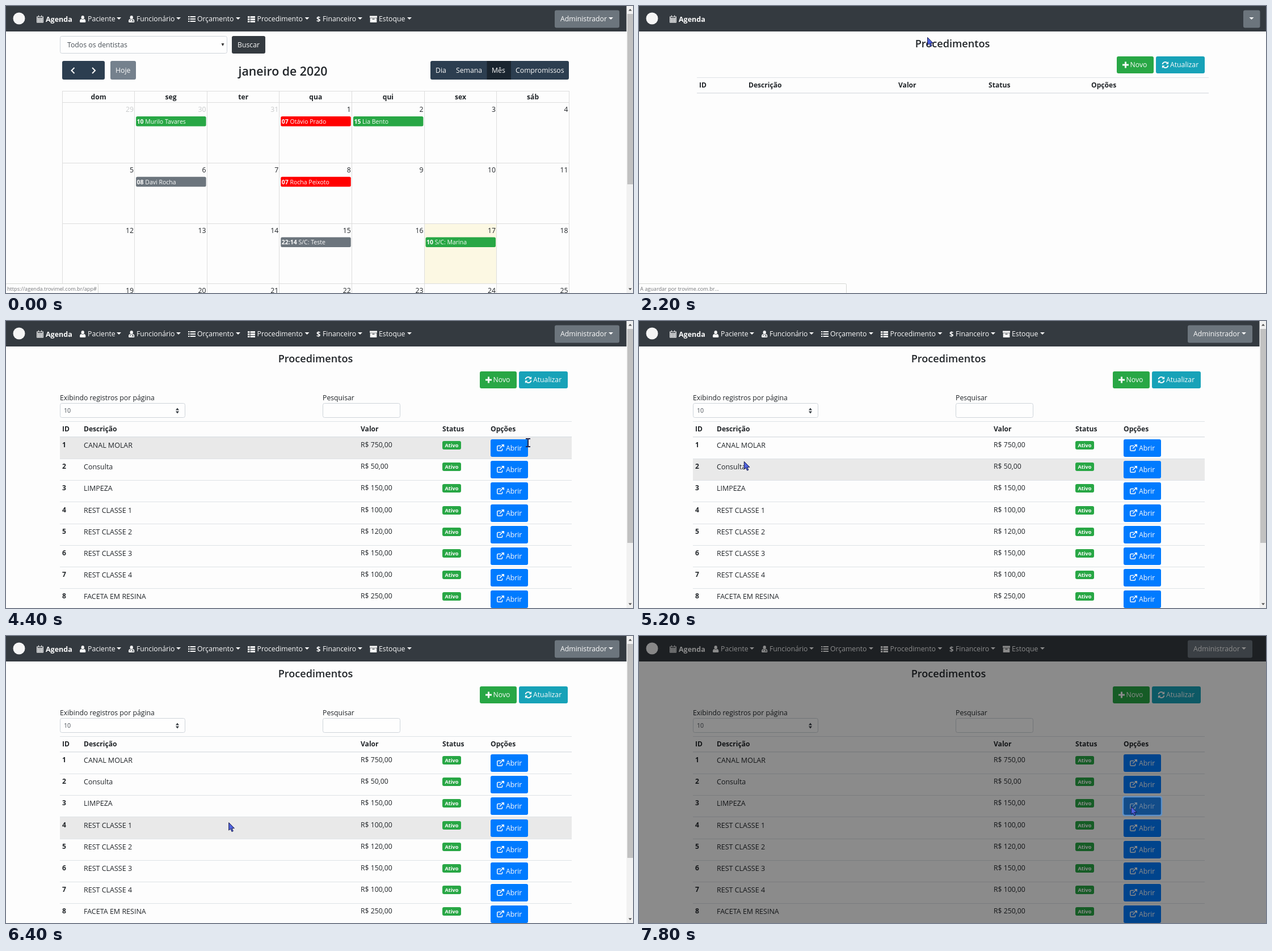
Write an HTML page that moves like this. It is 1105 px wide and 507 px high and loops after 8000 ms.

```html
<!DOCTYPE html>
<html lang="pt-BR">
<head>
<meta charset="utf-8">
<title>Procedimentos</title>
<style>
  html, body { margin: 0; width: 100%; height: 100%; overflow: hidden; background: #fdfdfd; }
  svg { display: block; }
  text { font-family: "Open Sans", "Noto Sans", sans-serif; white-space: pre; }
</style>
</head>
<body>
<svg id="stage" width="1105" height="507" viewBox="0 0 1105 507"></svg>
<script>
const INK = '#212529', LINE = '#dee2e6', GREEN = '#28a745', GREY = '#6c757d', BLUE = '#007bff';
const ROW_TOP = 205, ROW_H = 38.2;

// y is the vertical middle of the capitals
const text = (x, y, s, { size = 12.25, fill = INK, weight = 400, anchor = 'start' } = {}) =>
  `<text x="${x}" y="${Math.round(y + size * .36)}" font-size="${size}" fill="${fill}" font-weight="${weight}" text-anchor="${anchor}">${s}</text>`;
const bold = (x, y, s, opt = {}) => text(x, y, s, { size: 12.1, weight: 700, ...opt });
const white = (x, y, s, opt = {}) => text(x, y, s, { fill: '#fbfbfb', ...opt });
const rect = (x, y, w, h, fill, extra = '') =>
  `<rect x="${x}" y="${y}" width="${w}" height="${h}" fill="${fill}" ${extra}/>`;
const button = (x, y, w, h, fill, extra = '') => rect(x, y, w, h, fill, `rx="3" ${extra}`);
const field = (x, y, w, h) => button(x + .5, y + .5, w - 1, h - 1, '#fefefe', 'stroke="#ced4da"');
const path = (d, fill, extra = '') => `<path d="${d}" fill="${fill}" ${extra}/>`;
const stroke = (d, color, width = 1) => path(d, 'none', `stroke="${color}" stroke-width="${width}"`);
const at = (x, y, body) => `<g transform="translate(${x} ${y})">${body}</g>`;
const group = (id, body) => `<g id="${id}">${body}</g>`;
const caret = (x, y, fill = '#fbfbfb') => path(`M${x - 4} ${y - 2}h8l-4 4z`, fill);

const person = path('M2.5 3.2a2.7 3.1 0 1 1 5.4 0a2.7 3.1 0 1 1-5.4 0M0 10.5C0 7.5 1 6 2.6 6Q5.2 8 7.8 6C9.4 6 10.4 7.5 10.4 10.5Q10.4 12 9 12H1.4Q0 12 0 10.5Z', '#fbfbfb');
const bullets = (dot, bar) => [1, 5, 9].map(y =>
  rect(0, y, dot, bar, '#fbfbfb') + rect(dot + 1.2, y, 11.8 - dot, bar, '#fbfbfb')).join('');
const icon = {
  calendar: stroke('M.7 2.5h10.6v9.8H.7zM.7 5.4h10.6M.7 7.7h10.6M.7 10h10.6M3.4 5v7M6 5v7M8.6 5v7M3.4 0v3M8.6 0v3', '#fbfbfb', 1.15),
  person,
  doctor: person + stroke('M3 7v3M7.4 7v2M6.2 10.6v-1.4h2.4v1.4', '#343a40', .9),
  list: bullets(2.4, 2),
  table: bullets(3.4, 3),
  archive: rect(0, .5, 13, 3.2, '#fbfbfb') + rect(.7, 4.4, 11.6, 7.6, '#fbfbfb') + rect(4.5, 5.6, 4, 1.2, '#343a40'),
  plus: path('M4 0h3v4h4v3H7v4H4V7H0V4h4z', '#fbfbfb'),
  refresh: stroke('M1 5A5 5 0 0 1 9.6 2.6M11 7A5 5 0 0 1 2.4 9.4', '#fbfbfb', 1.9) +
    path('M11.6 0v4.8H6.8zM.4 12V7.2h4.8z', '#fbfbfb'),
  open: stroke('M7 2.5H2.4Q.8 2.5 .8 4.1v5.6q0 1.6 1.6 1.6H8q1.6 0 1.6-1.6V7.5M5 7.3L11 1.4', '#fbfbfb', 1.5) +
    path('M7.8 0H13v5.2z', '#fbfbfb')
};

function navigation() {
  const items = [
    ['person', 130, 144, 'Paciente', 199], ['doctor', 216, 230, 'Funcionário', 304],
    ['list', 321, 337, 'Orçamento', 409], ['table', 426, 442.5, 'Procedimento', 530.5],
    [null, 547, 558, 'Financeiro', 624], ['archive', 641, 657, 'Estoque', 711]
  ];
  const menu = items.map(([name, ix, tx, label, cx]) =>
    (name ? at(ix, 17, icon[name]) : white(ix, 23, '$', { weight: 700, size: 13 })) +
    white(tx, 23, label) + caret(cx, 22)).join('');
  return rect(0, 0, 1105, 45, '#343a40') +
    '<circle cx="23" cy="22" r="10.5" fill="#f5f5f5"/>' +
    at(54, 16.5, icon.calendar) + bold(70, 23, 'Agenda', { fill: '#fdfdfd', size: 12.5 }) +
    group('menu', menu + button(967, 7.5, 114, 31, GREY) + white(977, 23, 'Administrador') + caret(1066, 22)) +
    group('account', button(1065, 7.5, 29.5, 31, GREY) + caret(1079.5, 22));
}

function calendar() {
  const col = i => 99.5 + i * 127.6, row = i => 170.5 + i * 106.8;
  const events = [
    [1, 0, '10', 'Murilo Tavares', GREEN], [3, 0, '07', 'Otávio Prado', '#f00'], [4, 0, '15', 'Lia Bento', GREEN],
    [1, 1, '08', 'Davi Rocha', GREY], [3, 1, '07', 'Rocha Peixoto', '#f00'],
    [3, 2, '22:14', 'S/C: Teste', GREY], [5, 2, '10', 'S/C: Marina', GREEN]
  ];
  let s = field(95, 53, 295, 31) + text(108, 69, 'Todos os dentistas', { fill: '#495057' }) +
    path('M379.5 66h5l-2.5 5z', '#333') +
    button(398, 53, 59, 31, '#343a40') + white(408, 69, 'Buscar') +
    button(99, 97, 75, 33, '#2c3e50') +
    stroke('M120.5 109l-5 5 5 5M152 109l5 5-5 5', '#fbfbfb', 2) +
    button(184, 97, 45, 33, '#75818d') + white(193, 114, 'Hoje') +
    text(488, 115, 'janeiro de 2020', { size: 21.3, weight: 600, anchor: 'middle' }) +
    button(748, 97, 244, 33, '#2c3e50') + rect(847.5, 97, 42.5, 33, '#1a252f') +
    [[757, 'Dia'], [793, 'Semana'], [856, 'Mês'], [898, 'Compromissos']].map(([x, l]) => white(x, 114, l)).join('') +
    rect(col(5), row(2), 127.6, 106.8, '#fcf8e3');
  let grid = 'M99.5 150.5H992.5';
  for (let i = 0; i < 8; i++) grid += `M${Math.round(col(i)) - .5} 150V507`;
  for (let i = 0; i < 4; i++) grid += `M99 ${Math.floor(row(i)) + .5}H993`;
  s += stroke(grid, '#ddd');
  ['dom', 'seg', 'ter', 'qua', 'qui', 'sex', 'sáb'].forEach((d, i) =>
    s += bold(col(i) + 63.5, 160.5, d, { anchor: 'middle' }));
  for (let i = 0; i < 28; i++) {
    const day = i < 3 ? 29 + i : i - 2;
    s += text(col(i % 7) + 125.5, row(Math.floor(i / 7)) + 12, day,
      { anchor: 'end', fill: i < 3 ? '#c9cbcc' : INK });
  }
  for (const [c, r, hour, name, color] of events) {
    const x = col(c) + 2, y = row(r) + 24.5;
    s += rect(x, y, 123.5, 17.5, color, 'rx="2.5"') +
      white(x + 1.5, y + 9, `<tspan font-weight="700">${hour}</tspan> ${name}`, { size: 10.5 });
  }
  return s;
}

const pageHead = dx => at(dx, 0,
  text(545.5, 66, 'Procedimentos', { size: 18.1, weight: 600, anchor: 'middle' }) +
  button(835, 89, 65, 30, GREEN) + at(845, 98.5, icon.plus) + white(858.5, 104, 'Novo') +
  button(904, 89, 86, 30, '#17a2b8') + at(914.5, 98, icon.refresh) + white(929, 104, 'Atualizar'));

const tableHead = (x, y, columns) =>
  rect(x, y, 902, 1, LINE) + rect(x, y + 27, 902, 1.5, LINE) +
  ['ID', 'Descrição', 'Valor', 'Status', 'Opções'].map((l, i) => bold(columns[i], y + 14, l)).join('');

function procedures() {
  const rows = [
    ['CANAL MOLAR', 750], ['Consulta', 50], ['LIMPEZA', 150], ['REST CLASSE 1', 100],
    ['REST CLASSE 2', 120], ['REST CLASSE 3', 150], ['REST CLASSE 4', 100], ['FACETA EM RESINA', 250]
  ];
  let s = pageHead(0) +
    text(95, 136, 'Exibindo registros por página') + field(95, 145, 221, 26) +
    text(102, 158.5, '10', { size: 10.7, fill: '#495057' }) + path('M299 157.5h6l-3-4zM299 159.5h6l-3 4z', '#343a40') +
    text(558, 136, 'Pesquisar') + field(558, 145, 137, 26) +
    rect(95, 0, 902, ROW_H, '#e9e9e9', 'id="hover"') +
    tableHead(95, 177, [99, 137, 625, 769, 854]);
  rows.forEach(([name, price], i) => {
    const top = Math.round(ROW_TOP + i * ROW_H), y = top + 14;
    s += bold(99, y, i + 1) + text(137, y, name, { size: 12.5 }) + text(625, y, `R$ ${price},00`) +
      button(769, top + 7, 33, 15, GREEN) +
      bold(785.5, y + .7, 'Ativo', { size: 9.2, fill: '#fbfbfb', anchor: 'middle' }) +
      button(854, top + 4, 66, 31, BLUE, 'class="open"') +
      at(865, top + 13, icon.open) + white(881, top + 19.5, 'Abrir') +
      rect(95, top + 38, 902, 1, LINE);
  });
  return s;
}

const statusBar = (w, label) =>
  rect(-.5, 490.5, w, 18, '#fdfdfd', 'stroke="#d5d7d3" rx="2"') + text(2, 499.5, label, { size: 9.15, fill: '#75777a' });

const stage = document.getElementById('stage');
stage.innerHTML =
  rect(0, 0, 1105, 507, '#fdfdfd') +
  group('calendar', calendar() + statusBar(163, 'https://agenda.trovimel.com.br/app#')) +
  group('loading', pageHead(7) + tableHead(102, 126, [106, 193, 457, 616, 797]) +
    statusBar(366, 'A aguardar por trovime.com.br...')) +
  group('list', procedures()) +
  navigation() +
  group('scrollbar', rect(1093.5, 0, 12, 507, '#f1f1f1') + rect(1095, 14, 10, 301, '#c1c1c1', 'id="thumb"') +
    path('M1097 8.5h6l-3-3.5zM1097 498.5h6l-3 3.5z', '#505050')) +
  group('dim', rect(0, 0, 1105, 507, '#000', 'opacity=".45"') +
    button(853, 284, 68, 33, '#3d7fc4', 'fill-opacity=".3" stroke="#5a93d2" stroke-opacity=".85" stroke-width="2.4"')) +
  group('cursor',
    group('arrow', path('M.5 .5V14l3-2.6 2.3 5 2.3-1-2.2-4.9h4.3z', '#4f63e0', 'stroke="#1c1d4a"')) +
    group('beam', stroke('M-4 -7h3l1 1 1-1h3M0 -6V6M-4 7h3l1-1 1 1h3', '#25284f', 2)));

const el = id => document.getElementById(id);
const show = (id, on) => el(id).style.display = on ? '' : 'none';
const openButtons = [...document.querySelectorAll('.open')];

// time, x, y
const route = [
  [1000, 484, 14], [2000, 508, 55], [3600, 508, 55], [4400, 920, 215], [4800, 230, 222],
  [5000, 190, 228], [5600, 170, 304], [6000, 170, 304], [6600, 470, 338], [7200, 867, 301], [8000, 867, 301]
];
function cursorAt(t) {
  const i = Math.max(1, route.findIndex(p => p[0] >= t));
  const [t0, x0, y0] = route[i - 1], [t1, x1, y1] = route[i];
  const k = Math.max(0, (t - t0) / (t1 - t0)), e = k * k * (3 - 2 * k);
  return [x0 + (x1 - x0) * e, y0 + (y1 - y0) * e];
}

function draw(now) {
  const t = Math.floor(now % 8000 / 200) * 200;
  const onCalendar = t < 2200, loading = !onCalendar && t < 2600, onList = t >= 2600, dim = t >= 7800;
  show('calendar', onCalendar);
  show('loading', loading);
  show('list', onList);
  show('menu', !loading);
  show('account', loading);
  show('scrollbar', !loading && !dim);
  el('thumb').setAttribute('height', onCalendar ? 301 : 378);
  show('dim', dim);

  const [x, y] = cursorAt(t), beam = t >= 2600 && t < 4600;
  show('cursor', t >= 1000);
  show('beam', beam);
  show('arrow', !beam);
  el('cursor').setAttribute('transform', `translate(${x} ${y})`);

  const row = Math.floor((y - ROW_TOP) / ROW_H);
  show('hover', row >= 0 && !dim);
  el('hover').setAttribute('y', ROW_TOP + row * ROW_H);
  openButtons.forEach((b, i) =>
    b.setAttribute('fill', i === row && x > 854 && x < 919 ? '#0062cc' : BLUE));
}

const start = performance.now();
function tick() {
  draw(performance.now() - start);
  requestAnimationFrame(tick);
}
tick();
</script>
</body>
</html>
```
